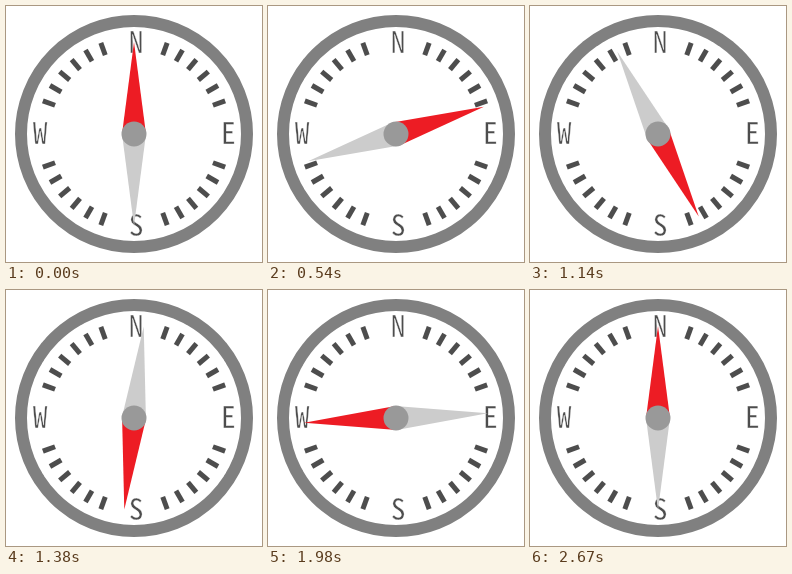
An HTML page for the animation above (2700 ms loop, 256x256 px).

```html
<!DOCTYPE html>
<html lang="en">
<head>
<meta charset="utf-8">
<title>Compass</title>
<style>
  html, body { margin: 0; width: 100%; height: 100%; overflow: hidden; background: #fff; }
  svg { display: block; width: 100%; height: 100%; }
  text {
    font: 29.5px "Noto Sans Mono CJK JP", "Noto Sans Mono CJK SC", "Noto Sans CJK JP", "Noto Sans Mono", monospace;
    fill: #4d4d4d;
    stroke: #fff;
    stroke-width: .4;
    text-anchor: middle;
  }
</style>
</head>
<body>
<svg viewBox="0 0 256 256">
  <circle cx="128" cy="128" r="113" fill="#fff" stroke="#808080" stroke-width="12"/>
  <g id="ticks" stroke="#4d4d4d" stroke-width="5"></g>
  <text x="130" y="47.2">N</text>
  <text x="222.3" y="138.2">E</text>
  <text x="130" y="230">S</text>
  <text x="34.2" y="138.2">W</text>
  <g id="needle">
    <path d="M116 128L128 220L140 128Z" fill="#ccc"/>
    <path d="M116 128L128 36L140 128Z" fill="#ed1c24"/>
  </g>
  <circle cx="128" cy="128" r="12.5" fill="#999"/>
</svg>
<script>
  const LOOP = 2700, STEP = 30, LAST = LOOP / STEP - 1;
  const ticks = document.getElementById("ticks");
  const needle = document.getElementById("needle");

  // Six ticks per quadrant, leaving room for the letters.
  for (let quarter = 0; quarter < 4; quarter++) {
    for (let angle = 20; angle <= 70; angle += 10) {
      const line = document.createElementNS("http://www.w3.org/2000/svg", "path");
      line.setAttribute("d", "M128 31V44");
      line.setAttribute("transform", `rotate(${quarter * 90 + angle} 128 128)`);
      ticks.append(line);
    }
  }

  function draw(time) {
    const step = Math.floor((time % LOOP) / STEP);
    needle.setAttribute("transform", `rotate(${step * 360 / LAST} 128 128)`);
  }

  const start = performance.now();
  function tick() {
    draw(performance.now() - start);
    requestAnimationFrame(tick);
  }
  draw(0);
  requestAnimationFrame(tick);
</script>
</body>
</html>
```
